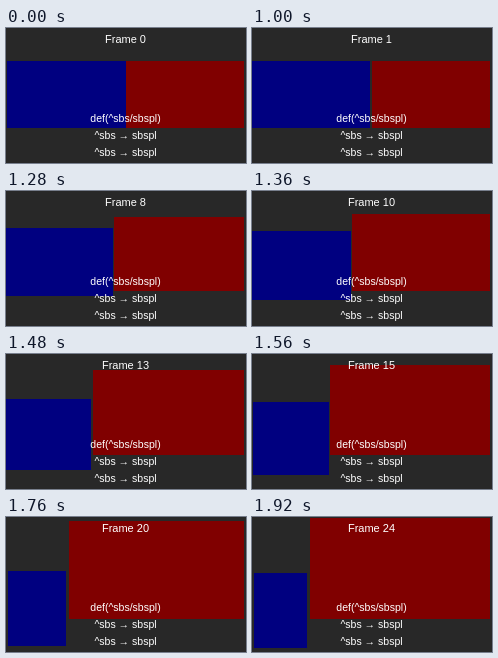
These frames come from a looping animation (240x135 px, 2.92 s). An HTML page:

```html
<!DOCTYPE html>
<html lang="en">
<head>
<meta charset="utf-8">
<title>Split panels</title>
<style>
html, body { margin: 0; width: 100%; height: 100%; overflow: hidden; background: #282828; }
svg { display: block; width: 100%; height: 100%; }
text { font: 10.5px "Liberation Sans", Arial, sans-serif; fill: #fff; text-anchor: middle; }
#label { font-size: 11px; }
</style>
</head>
<body>
<svg viewBox="0 0 240 135">
  <rect id="blue" fill="#000080"/>
  <rect id="red" fill="#800000"/>
  <text id="label" x="119.5" y="15"></text>
  <text x="119.5" y="94">def(^sbs/sbspl)</text>
  <text x="119.5" y="111">^sbs → sbspl</text>
  <text x="119.5" y="128">^sbs → sbspl</text>
</svg>
<script>
const LOOP = 2920, HOLD = 1000, STEP = 40, LAST = 24;
const $ = id => document.getElementById(id);
const blue = $("blue"), red = $("red"), label = $("label");

const ease = u => u < 0.5 ? 2 * u * u : 1 - 2 * (1 - u) ** 2;
const mix = (a, b, k) => a + (b - a) * k;

function place(rect, l, t, r, b) {
  rect.setAttribute("x", l);
  rect.setAttribute("y", t);
  rect.setAttribute("width", r - l);
  rect.setAttribute("height", b - t);
}

// Centre, height and aspect ratio change together, so the width bulges midway
function placeBlue(k) {
  const h = mix(67, 76, k);
  const w = h * mix(119 / 67, 53 / 76, k);
  const l = Math.floor(mix(60.5, 29.5, k) - w / 2);
  const t = Math.floor(mix(33, 56.1, k));
  place(blue, l, t, l + Math.floor(w), t + Math.floor(h));
}

function placeRed(k) {
  place(red,
    Math.ceil(mix(120, 57, k)), Math.ceil(mix(32.5, 0.5, k)),
    Math.floor(mix(238, 239, k)), Math.floor(mix(100, 102.8, k)));
}

function draw(ms) {
  const t = ms % LOOP;
  const n = t < HOLD ? 0 : Math.min(LAST, Math.floor((t - HOLD) / STEP) + 1);
  const k = ease(n / (LAST + 1));
  placeBlue(k);
  placeRed(k);
  label.textContent = "Frame " + n;
}

const start = performance.now();
function tick() {
  draw(performance.now() - start);
  requestAnimationFrame(tick);
}
draw(0);
requestAnimationFrame(tick);
</script>
</body>
</html>
```
